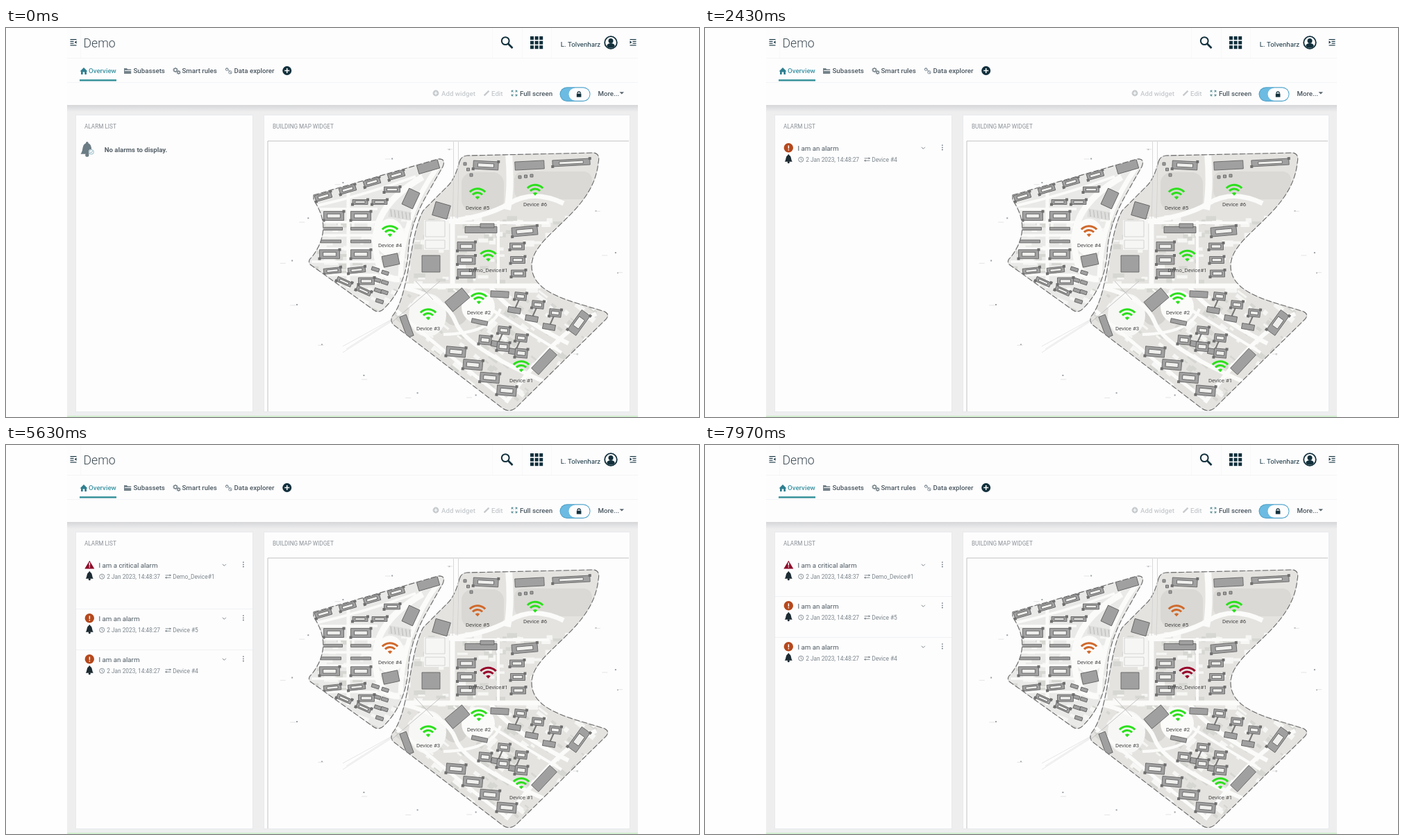
Write an HTML page with a canvas that moves like this. It is 998 px wide and 561 px high and loops after 8000 ms.

```html
<!DOCTYPE html>
<html lang="en">
<head>
<meta charset="utf-8">
<title>Building map dashboard</title>
<style>
html, body { margin: 0; width: 100%; height: 100%; overflow: hidden; background: #fefefe; }
canvas { display: block; width: 998px; height: 561px; }
</style>
</head>
<body>
<canvas id="stage" width="998" height="561"></canvas>
<script>
const W = 998, H = 561, LOOP = 8000;
const INK = '#12303c', TEXT = '#4b5860', MUTED = '#7b858b', PALE = '#c6cacd', TEAL = '#3d94a3';
const GREEN = '#2be01b', ORANGE = '#d0692b', RED = '#98052a', ROAD = '#fbfbfa';
const screen = document.getElementById('stage').getContext('2d');
const backdrop = document.createElement('canvas');
backdrop.width = W;
backdrop.height = H;
let g = backdrop.getContext('2d');

// Drawing helpers
function box(x, y, w, h, color) {
  g.fillStyle = color;
  g.fillRect(x, y, w, h);
}
function disc(x, y, r, color) {
  g.fillStyle = color;
  g.beginPath();
  g.arc(x, y, r, 0, 7);
  g.fill();
}
function ring(x, y, r, color, width = 1) {
  g.strokeStyle = color;
  g.lineWidth = width;
  g.beginPath();
  g.arc(x, y, r, 0, 7);
  g.stroke();
}
function oval(x, y, rx, ry, color) {
  g.fillStyle = color;
  g.beginPath();
  g.ellipse(x, y, rx, ry, 0, 0, 7);
  g.fill();
}
function fill(d, color) {
  g.fillStyle = color;
  g.fill(new Path2D(d));
}
function stroke(d, color, width = 1) {
  g.strokeStyle = color;
  g.lineWidth = width;
  g.stroke(new Path2D(d));
}
function pill(x, y, w, h, r, color) {
  g.fillStyle = color;
  g.beginPath();
  g.roundRect(x, y, w, h, r);
  g.fill();
}
function text(s, x, y, size, color, weight = 400, align = 'left') {
  g.font = `${weight} ${size}px Roboto, sans-serif`;
  g.textAlign = align;
  g.fillStyle = color;
  g.fillText(s, x, y);
}
function placed(x, y, deg, draw, scale = 1) {
  g.save();
  g.translate(x, y);
  g.rotate(deg * Math.PI / 180);
  g.scale(scale, scale);
  draw();
  g.restore();
}
function seeded(seed) {
  return () => (seed = (seed * 16807) % 2147483647) / 2147483647;
}

// Icons
function bell(x, y, scale, color) {
  placed(x, y, 0, () => {
    fill('M-5 3.6C-2.6 1-4.4-4.6 0-4.8C4.4-4.6 2.6 1 5 3.6Z', color);
    disc(0, -4.9, 1, color);
    disc(0, 4.4, 1.4, color);
  }, scale);
}
function menu(x, y, dir) {
  for (let i = 0; i < 4; i++) {
    const w = i % 3 ? 5 : 9;
    box(dir > 0 ? x - 4.5 : x + 4.5 - w, y - 4.5 + i * 2.8, w, 1.1, INK);
  }
  fill(`M${x + dir * 4.5} ${y - 2.2}v4.4l${-dir * 2.7}-2.2z`, INK);
}
function gear(x, y, r) {
  ring(x, y, r, '#6f7d84', 1.3);
  for (let a = 0; a < 6.2; a += Math.PI / 4)
    disc(x + Math.cos(a) * (r + .9), y + Math.sin(a) * (r + .9), .6, '#6f7d84');
}
function wifi(x, y, color) {
  const arc = r => g.arc(x, y + 8, r, -Math.PI * .76, -Math.PI * .24);
  g.strokeStyle = color;
  g.lineWidth = 3;
  for (const r of [15.3, 9.6]) {
    g.beginPath();
    arc(r);
    g.stroke();
  }
  g.fillStyle = color;
  g.beginPath();
  g.moveTo(x, y + 8.3);
  arc(4.6);
  g.fill();
}

// Page frame
function drawHeader() {
  box(0, 0, W, H, '#fefefe');
  box(88, 0, 822, 111, '#fdfdfe');
  box(88, 111, 822, 450, '#eeeeef');
  const shade = g.createLinearGradient(0, 110, 0, 121);
  shade.addColorStop(0, '#d3d4d6');
  shade.addColorStop(1, '#eeeeef');
  box(88, 111, 822, 10, shade);
  box(88, 43, 822, 1, '#f4f4f5');
  box(88, 78, 822, 1, '#f3f4f5');
  for (const x of [107, 700, 743, 785]) box(x, 0, 1, 43, '#f8f8f9');
  box(88, 559, 822, 2, '#d3efcf');

  menu(97, 20.5, 1);
  menu(903, 20.5, -1);
  text('Demo', 111.5, 28, 17.6, '#3c4a52', 300);
  ring(719.2, 18.6, 5.4, INK, 2);
  stroke('M723 22.5l6.5 6.5', INK, 2.6);
  for (let i = 0; i < 9; i++) box(755 + i % 3 * 6.6, 12 + Math.floor(i / 3) * 6.6, 5, 5, INK);
  text('L. Tolvenharz', 856, 27, 9.7, INK, 400, 'right');
  ring(871, 21, 8.8, INK, 1.8);
  disc(871, 18.4, 3.5, INK);
  oval(871, 25.4, 5.6, 3.4, INK);
}
function drawTabs() {
  fill('M106.5 62.5L112 57l5.5 5.5H116V67h-2.7v-3.5h-2.6V67H108v-4.5z', '#2f7f90');
  text('Overview', 119, 65.4, 9.7, TEAL, 500);
  box(106, 74.2, 53, 2.4, '#318f98');
  fill('M170 58h4l1.2 1.4h5V66H170z', '#74828a');
  box(171, 61, 10, 1, '#fdfdfe');
  text('Subassets', 183.5, 65.4, 9.7, TEXT, 500);
  gear(244, 60.5, 2.3);
  gear(248.6, 64, 1.7);
  text('Smart rules', 253.5, 65.4, 9.7, TEXT, 500);
  stroke('M316 60l2-2 7 8', '#84919a');
  ring(318.2, 59.6, 1.9, '#84919a');
  ring(322.8, 63.8, 2.2, '#84919a');
  text('Data explorer', 328.5, 65.4, 9.7, TEXT, 500);
  disc(404.7, 61.5, 6.5, INK);
  stroke('M401.2 61.5h7m-3.5-3.5v7', '#fff', 1.5);
}
function drawTools() {
  disc(619, 94, 4.4, PALE);
  stroke('M616.5 94h5m-2.5-2.5v5', '#fff', 1.2);
  text('Add widget', 627, 97.6, 9.7, PALE, 500);
  stroke('M688.6 97.4l6.9-6.8', PALE, 2.2);
  text('Edit', 699, 97.6, 9.7, PALE, 500);
  for (let turn = 0; turn < 360; turn += 90)
    placed(732, 94, turn, () => stroke('M1.4-3.8H3.8V-1.4M3.8-3.8L1.4-1.4', '#4d858b'));
  text('Full screen', 740, 97.6, 9.7, TEXT, 500);
  pill(797.5, 85.2, 44, 20.8, 10.4, '#4b9fc6');
  pill(798.5, 86.2, 42, 18.8, 9.4, '#6cbbe2');
  pill(810.5, 86.4, 30, 18.4, 9.2, '#fdfdfe');
  box(821.8, 94.6, 6.6, 5, INK);
  stroke('M823 94.6v-.6a2.1 2.1 0 0 1 4.2 0v.6', INK, 1.2);
  text('More...', 852.5, 97.6, 9.7, TEXT, 500);
  fill('M883.5 92.2h6.5l-3.2 3.4z', '#59666d');
}
function drawPanels() {
  for (const [x, w, title] of [[101, 254, 'ALARM LIST'], [372, 526, 'BUILDING MAP WIDGET']]) {
    box(x - 1, 125, w + 2, 429, '#e8e9eb');
    box(x, 126, w, 427, '#fdfdfe');
    text(title, x + 12, 145.3, 8.2, '#8b9196');
  }
  stroke('M897 163H377V553', '#c2c2c2');
}

// Site map
const WEST = 'M443 241L622 189Q634 188 629 200L608 237Q580 285 579 328Q574 375 545 404Q538 412 530 407' +
  'L438 341Q434 336 440 331Q472 290 443 248Z';
const EAST = 'M653 193Q655 185 664 184L846 180Q856 181 853 194C846 268 757 298 757 343C757 385 820 395 862 409' +
  'Q870 413 864 420L734 548Q725 555 716 549L558 428Q553 423 556 416C582 385 580 300 601 263L634 230Q646 220 653 193Z';

function building(x, y, w, h, deg = 0, court = false) {
  placed(x, y, deg, () => {
    const plan = new Path2D();
    plan.rect(-w / 2, -h / 2, w, h);
    g.fillStyle = '#a0a0a0';
    g.strokeStyle = '#5c5c5c';
    g.lineWidth = .8;
    g.fill(plan);
    g.stroke(plan);
    if (!court) return;
    // Open courtyard, with a wing at two opposite corners.
    box(-w * .32, -h * .22, w * .64, h * .44, '#efefed');
    g.strokeRect(-w * .32, -h * .22, w * .64, h * .44);
    for (const side of [-1, 1]) box(side * w / 2 - 2, -side * h / 2 - 2, 4, 4, '#6f6f6f');
  });
}
function row([x1, y1], [x2, y2], n, w, h, deg, court) {
  for (let i = 0; i < n; i++) {
    const k = i / (n - 1);
    building(x1 + (x2 - x1) * k, y1 + (y2 - y1) * k, w, h, deg, court);
  }
}
// Courtyard block joined by a stem to a slab below.
function towers([x1, y1], [x2, y2], n) {
  for (let i = 0; i < n; i++) {
    const k = i / (n - 1), x = x1 + (x2 - x1) * k, y = y1 + (y2 - y1) * k;
    stroke(`M${x} ${y}l-9 20`, '#777', 2);
    building(x, y, 17, 11, 6, true);
    building(x - 9, y + 20, 18, 8, 10);
  }
}
function site(edge, ground, seed, tilt, paint) {
  const shape = new Path2D(edge), rnd = seeded(seed);
  g.save();
  g.fillStyle = ground;
  g.fill(shape);
  g.clip(shape);
  for (let i = 0; i < 420; i++) {
    const x = 435 + rnd() * 435, y = 270 + rnd() * 280;
    const tone = rnd() < .55 ? '#f6f6f4' : '#d6d6d2';
    placed(x, y, y > 375 ? tilt : 0, () => box(0, 0, 4 + rnd() * 13, 2 + rnd() * 7, tone));
  }
  paint();
  g.restore();
  g.strokeStyle = '#cfcfcf';
  g.lineWidth = 1;
  g.stroke(shape);
  g.setLineDash([8, 3]);
  g.strokeStyle = '#6c6c6c';
  g.lineWidth = 1.1;
  g.stroke(shape);
  g.setLineDash([]);
}
function paintWest() {
  stroke('M600 215Q530 255 532 310T567 362', ROAD, 9);
  stroke('M622 200Q570 270 568 360', ROAD, 7);
  oval(553, 302, 21, 27, ROAD);
  stroke('M445 257Q520 240 590 214', ROAD, 4);
  for (let y = 261; y < 360; y += 19) stroke(`M440 ${y}H535`, ROAD, 3.5);
  stroke('M493 235V375', ROAD, 5);
  placed(567, 269, 10, () => {
    box(-16, -6, 32, 12, '#dededc');
    for (let x = -14; x < 16; x += 5.5) stroke(`M${x}-5l3 10`, '#b4b4b4', .8);
  });

  row([457, 243], [562, 212], 4, 24, 9, -16, true);
  row([510, 251], [538, 251], 2, 22, 7, 0, true);
  for (let i = 0; i < 4; i++) {
    const court = i % 3 === 0;
    row([472 - i * 2, 271 + i * 18.4], [511, 271 + i * 18.4], 2, 29, court ? 13 : 4, 0, court);
  }
  row([470, 350], [505, 349], 2, 25, 8, -6, true);
  row([487, 366], [515, 379], 2, 22, 7, 24, true);
  row([532, 348], [538, 394], 4, 11, 5, 18);
  row([546, 353], [545, 381], 3, 10, 5, 18);
  building(519, 365, 23, 10, 0, true);
  building(556, 233, 23, 8, 0, true);
  building(608, 200, 31, 13, -16);
  building(583, 246, 17, 25, 25);
  building(554, 335, 23, 16, -12);
}
function paintEast() {
  pill(656, 208, 61, 56, 16, '#d9d8d4');
  pill(732, 207, 112, 40, 12, '#dad9d5');
  stroke('M724 180Q728 230 722 262', ROAD, 10);
  stroke('M625 280Q690 274 725 253T803 253', ROAD, 7);
  stroke('M643 272V373M560 372H770', ROAD, 7);
  stroke('M709 278V372M640 281H782', ROAD, 4);
  box(602, 277, 36, 43, '#f6f6f5');
  for (const y of [278, 306]) stroke(`M604 ${y}h28v${y < 300 ? 23 : 12}h-28z`, '#cccccb', .8);
  disc(647, 411, 18, '#d3d2ce');
  disc(680, 402, 24, ROAD);
  oval(607, 414, 27, 31, '#f7f7f6');
  stroke('M575 375Q635 390 648 425T775 510', ROAD, 6);
  stroke('M560 405Q615 455 720 536', ROAD, 5);
  stroke('M697 372Q722 410 810 455M850 412Q790 440 720 540', ROAD, 6);
  stroke('M700 407L800 468M630 442Q700 440 712 405', ROAD, 4);

  row([661, 196], [670, 212], 3, 4, 4);
  row([740, 215], [757, 213], 3, 4, 4);
  building(691, 198, 36, 12, 3, true);
  building(754, 198, 42, 12, -3);
  building(814, 194, 54, 9, -3, true);
  building(627, 263, 22, 20, 16);
  building(684, 291, 46, 9);
  building(693, 285, 20, 6);
  building(747, 293, 37, 13, -5, true);
  row([663, 315], [663, 354], 3, 26, 13, 0, true);
  row([736, 315], [738, 354], 3, 21, 10, 0, true);
  building(612, 340, 26, 24);
  building(650, 392, 32, 18, -40);
  building(711, 384, 26, 9, 3);
  building(682, 424, 23, 6, 12);
  building(577, 430, 10, 32, -20);
  towers([741, 387], [791, 411], 3);
  towers([717, 436], [742, 447], 2);
  row([690, 450], [742, 469], 3, 18, 13, 5, true);
  row([648, 467], [721, 523], 4, 28, 14, 5, true);
  building(825, 425, 15, 35, 36, true);
  building(775, 481, 14, 39, 43);
}
function drawMap() {
  const rnd = seeded(23);
  for (let a = 0; a < 6.28; a += .36) {
    const x = 645 + Math.cos(a) * 235, y = 352 + Math.sin(a) * 178;
    box(x, y, 2, 2, '#9aa0a4');
    box(x - rnd() * 20, y + rnd() * 8, 8, 1, '#e4e4e4');
  }
  stroke('M485 468L560 420 645 356M490 463L565 415M485 459L556 420', '#e1e1e1', .8);
  site(WEST, '#e9e9e7', 41, 22, paintWest);
  site(EAST, '#e4e3e0', 97, 38, paintEast);
  stroke('M644.5 164V228L643 275M651.5 164V228L650 275', '#d0d0d0', .8);
  stroke('M555 425L625 365M590 365L615 392', '#b8b8b8', .8);
}

// Live parts
const devices = [
  ['Device #1', 742, 488], ['Device #2', 681, 390], ['Device #3', 608, 413], ['Device #4', 553, 293],
  ['Device #5', 679, 239], ['Device #6', 762, 233.5], ['Demo_Device#1', 694.5, 328.5]];
const alarms = [
  { at: 750, device: 'Device #4', time: '14:48:27' },
  { at: 4150, device: 'Device #5', time: '14:48:27' },
  { at: 5400, device: 'Demo_Device#1', time: '14:48:37', critical: true }];

function drawDevices(active) {
  for (const [name, x, y] of devices) {
    const alarm = active.find(a => a.device === name);
    wifi(x, y, !alarm ? GREEN : alarm.critical ? RED : ORANGE);
    text(name, x, y + 23.2, 7.8, '#444', 400, 'center');
  }
}
function drawAlarm({ device, time, critical }, y) {
  if (critical) fill(`M120.3 ${y - 6.3}l7 11.9h-14z`, '#8d0828');
  else disc(120.3, y - .3, 6.7, '#b5481c');
  box(119.6, y - 3.6, 1.5, 4.6, '#fff');
  box(119.6, y + 2, 1.5, 1.5, '#fff');
  text(critical ? 'I am a critical alarm' : 'I am an alarm', 133.5, y + 3.6, 9.7, TEXT);
  stroke(`M311.8 ${y - 1.2}l2.5 2.5 2.5-2.5`, '#7f898f');
  for (let i = -1; i < 2; i++) disc(341.8, y - .7 + i * 3.2, .9, '#6d787f');

  bell(120.3, y + 15.8, 1.1, '#1d2b32');
  ring(138.2, y + 16.7, 3.5, MUTED, .9);
  stroke(`M138.2 ${y + 14.6}v2.4l1.6.8`, MUTED, .8);
  text('2 Jan 2023, ' + time, 145.2, y + 19.8, 8.3, MUTED);
  for (const dir of [1, -1]) {
    const ay = y + 16.6 - dir * 1.7;
    stroke(`M229.5 ${ay}h8`, MUTED, .9);
    fill(`M${233.5 + dir * 4.5} ${ay}l${-dir * 2.4}-1.7v3.4z`, MUTED);
  }
  text(device, 240.2, y + 19.8, 8.35, MUTED);
}
function drawEmpty() {
  bell(116.8, 175, 1.85, '#6c7c84');
  disc(123, 178.8, 4.1, '#fdfdfe');
  ring(123, 178.8, 3.3, '#8fb9c5');
  stroke('M121.3 178.8l1.3 1.3 2.3-2.7', '#7eabb8');
  text('No alarms to display.', 141.7, 178.6, 9.65, '#566168', 700);
}
// A new row opens to its full height, then its margin collapses.
function rowHeight(age) {
  return age < 320 ? 77 * Math.min(1, age / 200) : 59;
}
function drawList(active, t) {
  if (!active.length) return drawEmpty();
  let top = 159;
  [...active].reverse().forEach((alarm, i) => {
    const height = rowHeight(t - alarm.at);
    g.save();
    g.beginPath();
    g.rect(101, top, 254, height);
    g.clip();
    if (i) box(101, top, 254, 1, '#f0f1f3');
    drawAlarm(alarm, top + 14);
    g.restore();
    top += height;
  });
}

function frame(elapsed) {
  const t = elapsed % LOOP;
  const active = alarms.filter(a => t >= a.at);
  g.drawImage(backdrop, 0, 0);
  drawList(active, t);
  drawDevices(active);
  requestAnimationFrame(() => frame(performance.now() - start));
}

drawHeader();
drawTabs();
drawTools();
drawPanels();
drawMap();
g = screen;
const start = performance.now();
frame(0);
</script>
</body>
</html>
```
